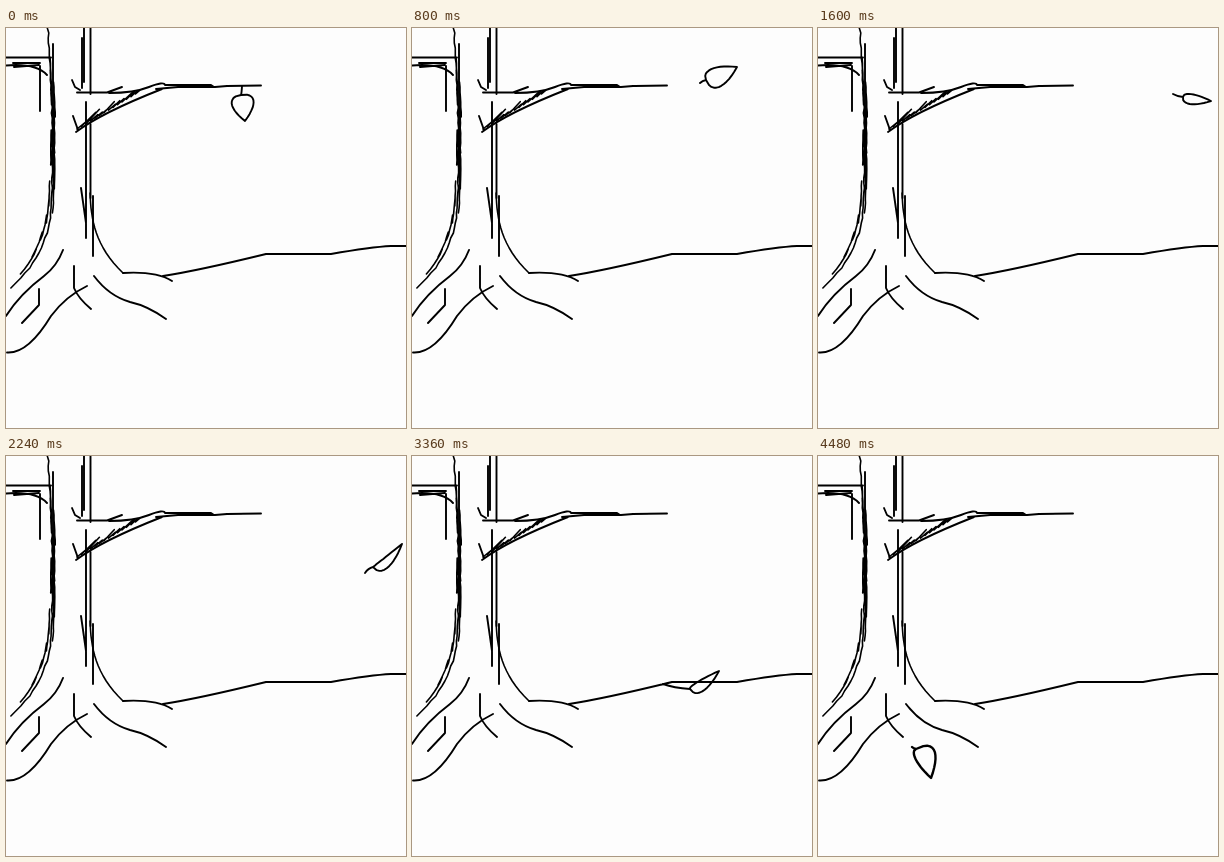
An HTML page that plays this animation: 400x400 px, repeating every 5.2 s.

```html
<!DOCTYPE html>
<html lang="en">
<head>
<meta charset="utf-8">
<title>Falling leaf</title>
<style>
html, body { margin: 0; width: 100%; height: 100%; overflow: hidden; background: #fdfdfd; }
svg { display: block; width: 100vw; height: 100vh; }
path { fill: none; stroke: #000; stroke-width: 1.9; stroke-linecap: round; stroke-linejoin: round; }
#bark { stroke-width: 1.6; }
</style>
</head>
<body>
<svg viewBox="0 0 400 400">
  <!-- long straight trunk lines -->
  <path d="M47 16V120M34 38V83M76 10V60M78 0V54M84.5 0V66M80 74V210M84.5 96V170M87 168V228M75 160L80 195"/>
  <!-- left branch -->
  <path d="M0 29.5H45M0 37.5Q30 35 41 47M7 35H34M8 39L33 37"/>
  <!-- right branch -->
  <path d="M66 52L69 59 74 62M71 64.5H101L116 59M103 65Q128 65 143 59T159 57H205L208 59M150 61L172 59H209L221 58 255 57.5M70 104Q95 85 156 61M67 88L72 102"/>
  <!-- ground and roots -->
  <path d="M117 245Q150 243 166 253M157 248C190 243 215 237 260 226H325Q365 219 385 218H400"/>
  <path d="M57 222Q51 238 38 248Q14 266 0 288M33 261V277L16 295M1 324.5Q22 326 45 288Q60 268 81 258M68 238V260Q72 270 85 281M88 248Q103 268 124 274Q142 278 160 291"/>
  <path id="bark"/>
  <path id="leaf"/>
</svg>
<script>
const LOOP = 5200, STEP = 80;
const el = id => document.getElementById(id);
const mix = (a, b, k) => a + (b - a) * k;
const line = pts => 'M' + pts.map(p => p.map(v => v.toFixed(1)).join(' ')).join('L');

let seed = 7;
const rnd = (lo, hi) => mix(lo, hi, (seed = seed * 16807 % 2147483647) / 2147483647);

// Trunk edges: straight down, then flaring into the roots.
const flare = (y, h) => Math.max(0, (y - 150) / h) ** 3;
const leftEdge = y => 46 - 46 * flare(y, 114) - 4 * Math.max(0, 1 - y / 80);
const rightEdge = y => 84 + 33 * flare(y, 95);

function trace(edge, from, to, dx = 0, wobble = 0) {
  const pts = [];
  for (let y = from; y <= to; y += 5) pts.push([edge(y) + dx + rnd(-wobble, wobble), y]);
  return line(pts);
}

function bark() {
  let d = trace(leftEdge, 0, 264, 0, 0.7) + trace(rightEdge, 165, 245);
  for (let i = 0; i < 11; i++) {
    const y = 30 + i * 12;
    d += trace(leftEdge, y, y + 35, rnd(-2, 3), 0.3);
  }
  for (let i = 0; i < 5; i++) {
    const y = 153 + i * 17;
    d += trace(leftEdge, y, y + 27, rnd(-6, -2), 0.3);
  }
  // hatching on the underside of the branch
  for (let i = 0; i < 14; i++) {
    const x = 71 + i * 4.5, y = 101 - i * 2.7, size = rnd(8, 17) * (1 - i / 25);
    d += line([[x, y], [x + size, y - size * rnd(0.8, 1.1)]]);
  }
  return d;
}

// Leaf pose: stem end, joint, tip, width of each half, pen weight.
const hang = [236, 58, 235, 67, 239, 93, 10.5, 11.5, 1.9];
const glide = [288, 55, 294, 52, 325, 39, 11.5, 8, 1.9];
const flat = [355, 66, 365, 69, 393, 73, 6, 4, 1.9];
const turn = [359, 117, 367, 111, 396, 88, 9.5, 0, 1.9];
const scoop = [304, 169, 331, 174, 360, 156, 8.5, 2, 1.9];
const near = [196, 251, 208, 264, 241, 320, 20, 28, 2.4];
const rest = [94, 291, 98, 293, 113, 322, 5, 15.5, 2.4];
const shift = (pose, dx, dy) => pose.map((v, i) => i > 5 ? v : v + (i % 2 ? dy : dx));

const keys = [
  [0, hang], [240, hang], [560, shift(glide, -48, 2)],
  [800, glide], [880, glide],
  [1440, shift(flat, 4, -6)], [1600, flat], [1680, flat],
  [2240, turn], [2880, scoop], [3360, shift(scoop, -53, 59)],
  [3840, near], [4240, shift(rest, 45, 13)], [4480, rest], [LOOP, rest]
];

function poseAt(t) {
  const i = keys.findIndex(k => k[0] > t);
  const [t0, a] = keys[i - 1], [t1, b] = keys[i];
  return a.map((v, n) => mix(v, b[n], (t - t0) / (t1 - t0)));
}

// Blunt at the joint, pointed at the tip, peak of 1.
const profile = u => u ** 0.4 * (1 - u) / 0.433;

function leafPath([sx, sy, jx, jy, tx, ty, wa, wb]) {
  const len = Math.hypot(tx - jx, ty - jy), nx = (jy - ty) / len, ny = (tx - jx) / len;
  const at = (u, w) => [mix(jx, tx, u) + nx * w * profile(u), mix(jy, ty, u) + ny * w * profile(u)];
  const edge = [];
  for (let i = 0; i <= 12; i++) edge.push(at((i / 12) ** 1.5, wa));
  for (let i = 12; i >= 0; i--) edge.push(at((i / 12) ** 1.5, -wb));
  return `M${sx} ${sy}Q${mix(sx, jx, 0.4)} ${mix(sy, jy, 0.8)} ${jx} ${jy}` + line(edge);
}

el('bark').setAttribute('d', bark());

function draw(now) {
  const pose = poseAt(Math.floor(now % LOOP / STEP) * STEP);
  el('leaf').setAttribute('d', leafPath(pose));
  el('leaf').style.strokeWidth = pose[8];
  requestAnimationFrame(draw);
}
draw(0);
</script>
</body>
</html>
```
